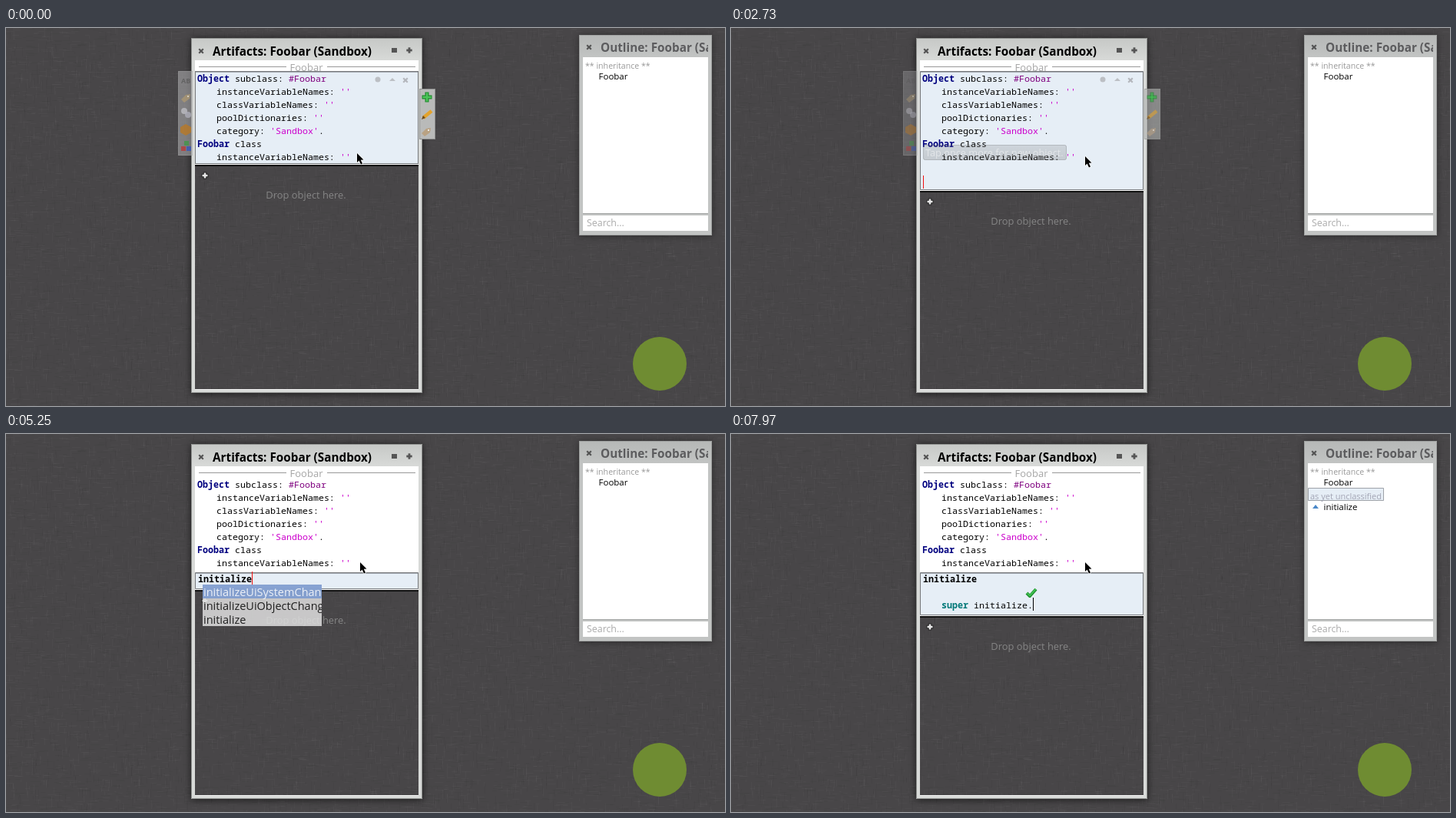
An HTML page with a canvas for the animation above (8000 ms loop, 936 by 492 pixels).

```html
<!DOCTYPE html>
<html lang="en">
<head>
<meta charset="utf-8">
<title>Artifacts</title>
<style>
html, body { margin: 0; width: 100%; height: 100%; overflow: hidden; background: #484548; }
canvas { display: block; }
</style>
</head>
<body>
<canvas id="stage" width="936" height="492"></canvas>
<script>
const W = 936, H = 492, LOOP = 8000;
const ctx = document.getElementById('stage').getContext('2d');
const UI = '"Open Sans", "Noto Sans", sans-serif';
const MONO = '"Noto Sans Mono", monospace';
const CHAR = 7, LINE = 17;
const NAVY = '#00007f', PURPLE = '#7f007f', MAGENTA = '#cc00cc', TEAL = '#007878';
const FOCUS = '#e6eef6', RED = '#f01010', TITLE_SIZE = 15.3;

// Helpers
const clamp = v => Math.max(0, Math.min(1, v));
const ramp = (t, a, b) => clamp((t - a) / (b - a));
const between = (t, a, b) => t >= a && t < b;

function rect(x, y, w, h, fill) {
  ctx.fillStyle = fill;
  ctx.fillRect(x, y, w, h);
}
function frame(x, y, w, h, color) {
  ctx.strokeStyle = color;
  ctx.lineWidth = 1;
  ctx.strokeRect(x + .5, y + .5, w - 1, h - 1);
}
function disc(x, y, r, fill) {
  ctx.fillStyle = fill;
  ctx.beginPath();
  ctx.arc(x, y, r, 0, 7);
  ctx.fill();
}
function poly(points, fill) {
  ctx.fillStyle = fill;
  ctx.beginPath();
  points.forEach(p => ctx.lineTo(...p));
  ctx.closePath();
  ctx.fill();
}
function line(points, color, width) {
  ctx.strokeStyle = color;
  ctx.lineWidth = width;
  ctx.beginPath();
  points.forEach(p => ctx.lineTo(...p));
  ctx.stroke();
}
function text(s, x, y, size, color, weight = 400, align = 'left') {
  ctx.font = `${weight} ${size}px ${UI}`;
  ctx.fillStyle = color;
  ctx.textAlign = align;
  ctx.fillText(s, x, y);
}
function code(x, y, ...tokens) {
  ctx.textAlign = 'left';
  for (const [s, color = '#000', weight = 400] of tokens) {
    ctx.font = `${weight} 11.67px ${MONO}`;
    ctx.fillStyle = color;
    ctx.fillText(s, x, y);
    x += s.length * CHAR;
  }
}
function plus(x, y, r, width, color) {
  line([[x - r, y], [x + r, y]], color, width);
  line([[x, y - r], [x, y + r]], color, width);
}
function cross(x, y, r, color) {
  line([[x - r, y - r], [x + r, y + r]], color, 2.2);
  line([[x + r, y - r], [x - r, y + r]], color, 2.2);
}
function faded(alpha, draw) {
  if (alpha <= 0) return;
  ctx.save();
  ctx.globalAlpha = alpha;
  draw();
  ctx.restore();
}
function clipped(x, y, w, h, draw) {
  ctx.save();
  ctx.beginPath();
  ctx.rect(x, y, w, h);
  ctx.clip();
  draw();
  ctx.restore();
}
function verticalFill(y, h, from, to) {
  const g = ctx.createLinearGradient(0, y, 0, y + h);
  g.addColorStop(0, from);
  g.addColorStop(1, to);
  return g;
}
const caret = (x, baseline, color = '#000') => rect(x, baseline - 14, 1, 17, color);

// Woven backdrop made of faint threads
function makeLinen() {
  const canvas = document.createElement('canvas');
  canvas.width = W;
  canvas.height = H;
  const g = canvas.getContext('2d');
  g.fillStyle = '#484648';
  g.fillRect(0, 0, W, H);
  let seed = 7;
  const random = () => (seed = (seed * 16807) % 2147483647) / 2147483647;
  for (let i = 0; i < 14000; i++) {
    g.fillStyle = random() < .5 ? 'rgba(255,255,255,.025)' : 'rgba(0,0,0,.035)';
    const length = 3 + random() * 10, flat = random() < .6;
    g.fillRect(random() * W | 0, random() * H | 0, flat ? length : 1, flat ? 1 : length);
  }
  return canvas;
}
const linen = makeLinen();

function windowFrame(x, y, w, h, light, dark, border, shadow) {
  ctx.save();
  ctx.shadowColor = `rgba(0,0,0,${shadow})`;
  ctx.shadowBlur = 9;
  ctx.shadowOffsetY = 1;
  rect(x, y, w, h, verticalFill(y, 30, dark, light));
  ctx.restore();
  frame(x, y, w, h, border);
}

function pencil(x, y) {
  line([[x - 5, y + 5], [x + 6, y - 4]], '#e3a32c', 4.5);
  poly([[x - 7, y + 7], [x - 5, y + 2], [x - 2, y + 5]], '#6b4a20');
}
function tag(x, y, color) {
  poly([[x - 6, y + 2], [x, y - 4], [x + 6, y - 5], [x + 5, y + 1], [x - 2, y + 6]], color);
  disc(x + 3, y - 2, 1, '#fff');
}

function sideTabs(alpha) {
  faded(alpha * .45, () => {
    rect(224, 56, 19, 110, '#c6c6c8');
    frame(224, 56, 19, 110, '#999');
  });
  faded(alpha * .7, () => {
    text('AB', 228, 72, 9, '#555', 700);
    tag(234, 91, '#b09a70');
    disc(232, 108, 4, '#c4c4cc');
    disc(237, 113, 4, '#b4b4c0');
    poly([[234, 125], [241, 129], [241, 136], [234, 140], [227, 136], [227, 129]], '#c07818');
    rect(232, 147, 6, 6, '#3a9a40');
    rect(228, 154, 6, 6, '#c03030');
    rect(235, 154, 6, 6, '#3050c0');
  });
  faded(alpha, () => {
    rect(538, 79, 21, 66, '#b9bab9');
    frame(538, 79, 21, 66, '#8f908f');
    plus(548, 90, 6.5, 5, '#1f8a2c');
    plus(548, 90, 5.5, 2.5, '#4cc45a');
    pencil(548, 112);
    tag(547, 135, '#b9a283');
  });
}

function selectRows(x, y, rows, lastEnd) {
  const full = (rows - 1) * LINE;
  const fill = ctx.createLinearGradient(x + 180, y, x + 110, y + rows * LINE);
  fill.addColorStop(0, '#b2c2ee');
  fill.addColorStop(1, '#c4b8ee');
  rect(x, y, 284, full, fill);
  rect(x, y + full, lastEnd - x, LINE, fill);
}

function focusPane(y, bottom) {
  rect(246, y, 291, bottom - y, FOCUS);
  frame(246, y, 291, bottom - y, '#77797c');
  rect(247, y + 1, 289, 1, '#a5abb2');
}

function classPane(t) {
  const focused = t < 2910;
  const extra = focused ? (t >= 2480) + (t >= 2600) : 0;
  const bottom = 178 + extra * LINE;
  rect(246, 57, 291, bottom - 56, '#fff');
  if (focused) {
    focusPane(56, bottom - 1);
    const selected = between(t, 920, 1250);
    if (selected) selectRows(249, 58, 7, 449);
    faded(selected ? .5 : 1, () => {
      disc(484, 67, 3.5, '#bcbfc4');
      poly([[499, 69], [503, 65], [507, 69]], '#bcbfc4');
      cross(520, 68, 2.8, '#b4b7bc');
    });
  }
  const row = i => 70 + i * LINE;
  code(249, row(0), ['Object', NAVY, 700], [' subclass: '], ['#Foobar', PURPLE]);
  ['instanceVariableNames', 'classVariableNames', 'poolDictionaries'].forEach((name, i) =>
    code(274, row(i + 1), [name + ': '], ["''", MAGENTA]));
  code(274, row(4), ['category: '], ["'Sandbox'", MAGENTA], ['.']);
  code(249, row(5), ['Foobar', NAVY, 700], [' class']);
  code(274, row(6), ['instanceVariableNames: '], ["''", MAGENTA]);
  if (between(t, 600, 920) || between(t, 1250, 1950)) caret(449, row(6));
  if (extra) caret(250, row(6 + extra), RED);
  return bottom + 1;
}

const selectorKeys = [3440, 3570, 3690, 3890, 4220, 4600, 4860, 5120, 5250, 5250];
const superCount = t => t < 6330 ? 0 : Math.min(17, 1 + Math.floor((t - 6330) / 85));

function methodPane(t) {
  const rows = t < 3570 ? 5 : t < 5510 ? 1 : t < 5630 ? 2 : 3;
  const top = 187 + rows * LINE;
  const row = i => 193 + i * LINE;
  rect(246, 178, 291, top - 178, '#fff');
  focusPane(180, top - 2);
  if (t < 3440) {
    selectRows(249, 181, 5, 344);
    code(250, row(0), ['message', '#000', 700], [' selector and argument names']);
    code(274, row(1), ['"comment stating purpose of message"', TEAL]);
    code(274, row(3), ['| temporary variable names |']);
    code(274, row(4), ['statements']);
    return top;
  }
  const typed = selectorKeys.filter(k => k <= t).length;
  code(250, row(0), ['initialize'.slice(0, typed), '#000', 700]);
  if (rows === 1) caret(250 + typed * CHAR, row(0), t >= 5250 ? RED : '#000');
  else {
    const n = superCount(t);
    code(274, row(2), ['super'.slice(0, n), TEAL, 700], [' initialize.'.slice(0, Math.max(0, n - 5))]);
    caret(274 + n * CHAR, row(rows - 1), t < 6330 ? RED : '#000');
  }
  return top;
}

function artifactsWindow(t) {
  windowFrame(241, 13, 301, 462, '#d8dad8', '#c6c8c6', '#929492', .65);
  cross(254, 30, 2.8, '#555');
  text('Artifacts: Foobar (Sandbox)', 269, 36, TITLE_SIZE, '#000', 700);
  rect(502, 26, 7, 6, '#555');
  plus(525, 29, 3.7, 2.8, '#555');
  rect(246, 42, 291, 15, '#fff');
  rect(251, 50, 114, 1, '#999');
  rect(418, 50, 115, 1, '#999');
  text('Foobar', 391, 56, 13, '#a5a5a5', 400, 'center');
  ctx.drawImage(linen, 246, 178, 291, 292, 246, 178, 291, 292);
  rect(246, 470, 291, 1, '#f4f4f4');

  let top = classPane(t);
  if (t >= 2910) top = methodPane(t);
  rect(246, top - 1, 291, 2, '#101010');
  plus(259, top + 13, 4.5, 4.5, '#222');
  plus(259, top + 13, 3.5, 2.5, '#e8e8e8');
  text('Drop object here.', 390.5, top + 43, 12.9, '#858585', 400, 'center');
}

function outlineWindow(t) {
  windowFrame(746, 9, 173, 261, '#c2c4c3', '#b6b8b7', '#a0a2a1', .4);
  cross(759, 25, 2.8, '#555');
  clipped(751, 10, 163, 28, () => text('Outline: Foobar (Sandbox)', 774, 31, TITLE_SIZE, '#5c5c5e', 700));
  rect(751, 38, 163, 203, '#fff');
  rect(751, 241, 163, 1, '#a2a4a3');
  rect(751, 244, 163, 20, '#fff');
  text('Search...', 756, 258, 12.4, '#aaa');
  text('** inheritance **', 754, 53, 10.6, '#999');
  text('Foobar', 771.5, 67, 11.5, '#000');
  if (t >= 7970) {
    rect(751, 70, 99, 17, FOCUS);
    frame(751, 70, 99, 17, '#9ea2a8');
    text('as yet unclassified', 754, 85, 11, '#a2a4b4');
    poly([[757, 97], [761, 92], [765, 97]], '#4a88c8');
    text('initialize', 771.5, 99, 11.5, '#000');
  }
}

function gear(x, y, color, hole) {
  for (let a = 0; a < Math.PI; a += Math.PI / 4) {
    const dx = 7 * Math.cos(a), dy = 7 * Math.sin(a);
    line([[x - dx, y - dy], [x + dx, y + dy]], color, 2);
  }
  disc(x, y, 5, color);
  disc(x, y, 2, hole);
}

function toolbarIcons(y) {
  rect(487, y - 7, 8, 13, '#d9a63c');
  rect(490, y - 5, 9, 12, '#fff6d8');
  frame(490, y - 5, 9, 12, '#998850');
  gear(526, y, '#989a9a', '#d0d0d0');
  gear(550, y, '#38863a', '#70b860');
  disc(574, y, 7, '#5b6f88');
  disc(574, y, 5.5, '#e7edf2');
  line([[574, y - 4], [574, y], [578, y]], '#334', 1);
  rect(603, y - 7, 10, 6, '#fff');
  rect(600, y - 2, 16, 7, '#667481');
  rect(603, y + 3, 10, 4, '#dce5ee');
  line([[627, y + 7], [631, y + 2]], '#806040', 2.5);
  disc(634, y - 2, 5, '#777');
  disc(634, y - 2, 3.9, '#dce6ed');
  line([[653, y + 3], [653, y - 3], [659, y - 3]], '#777', 1);
  [[651, y - 2], [658, y - 7], [658, y + 2]].forEach(([x, top]) => rect(x, top, 5, 5, '#edf0f0'));
  disc(686, y - 5, 2, '#4284c4');
  disc(692, y - 5, 2, '#4284c4');
  rect(688, y - 2, 2, 4, '#4284c4');
  poly([[685, y + 2], [693, y + 2], [689, y + 7]], '#4284c4');
  rect(710, y - 7, 10, 12, '#82908e');
  rect(707, y - 5, 10, 13, '#f1f4f2');
  frame(707, y - 5, 10, 13, '#777');
}

function toolbar() {
  faded(.92, () => rect(478, 131, 251, 25, '#bcbebd'));
  frame(478, 131, 251, 25, '#8d8f8e');
  faded(.8, () => toolbarIcons(143));
}

function tooltip(y, alpha) {
  faded(alpha, () => {
    ctx.beginPath();
    ctx.roundRect(250.5, y + .5, 186, 19, 2);
    ctx.fillStyle = verticalFill(y, 20, '#7a7a7a', '#505050');
    ctx.fill();
    ctx.strokeStyle = '#303030';
    ctx.lineWidth = 1;
    ctx.stroke();
  });
  // The label becomes visible sooner than its box.
  faded(Math.sqrt(alpha), () => text('Tap once more for new object.', 253, y + 15, 12.75, '#fff'));
}

function completions(x, y, alpha) {
  faded(alpha, () => clipped(x, y, 155, 54, () => {
    rect(x, y, 155, 54, '#dedede');
    rect(x, y, 155, 18, '#7898cf');
    ['initializeUiSystemChanged:', 'initializeUiObjectChanged:', 'initialize'].forEach((s, i) =>
      text(s, x + 1, y + 15 + i * 18, 14.5, i ? '#000' : '#fff'));
  }));
}

function pointer(t) {
  const go = ramp(t, 60, 660), back = ramp(t, 1250, 1620);
  const x = 457 + 24 * go - 20 * back;
  const y = 163 + 4 * go + 6 * Math.sin(Math.PI * go);
  const shape = [[0, 0], [0, 12], [2.6, 9.6], [5, 14.5], [7, 13.5], [4.8, 8.8], [8.5, 8.5]]
    .map(([dx, dy]) => [x + dx, y + dy]);
  ctx.lineJoin = 'round';
  line([...shape, shape[0]], 'rgba(255,255,255,.8)', 1.5);
  poly(shape, '#000');
}

function draw(t) {
  ctx.drawImage(linen, 0, 0);
  disc(851, 437, 35, '#6f8c32');
  artifactsWindow(t);
  outlineWindow(t);
  sideTabs(1 - ramp(t, 2600, 2910));
  if (between(t, 920, 1250)) toolbar();
  tooltip(152, ramp(t, 2680, 2910) * (1 - ramp(t, 4200, 4400)));
  tooltip(177, ramp(t, 5630, 5870) * (1 - ramp(t, 7140, 7330)));
  if (between(t, 5250, 5510)) completions(256, 196, t < 5310 ? .85 : 1);
  if (between(t, 6960, 7690)) completions(322, 230, ramp(t, 6960, 7100));
  if (t >= 7970) {
    line([[385, 207], [389, 211], [397, 202]], '#1c8a2a', 4);
    line([[385.5, 207], [389, 210.5], [396.5, 202]], '#3fc050', 2);
  }
  pointer(t);
}

function tick(now) {
  draw(now % LOOP);
  requestAnimationFrame(tick);
}
requestAnimationFrame(tick);
</script>
</body>
</html>
```
